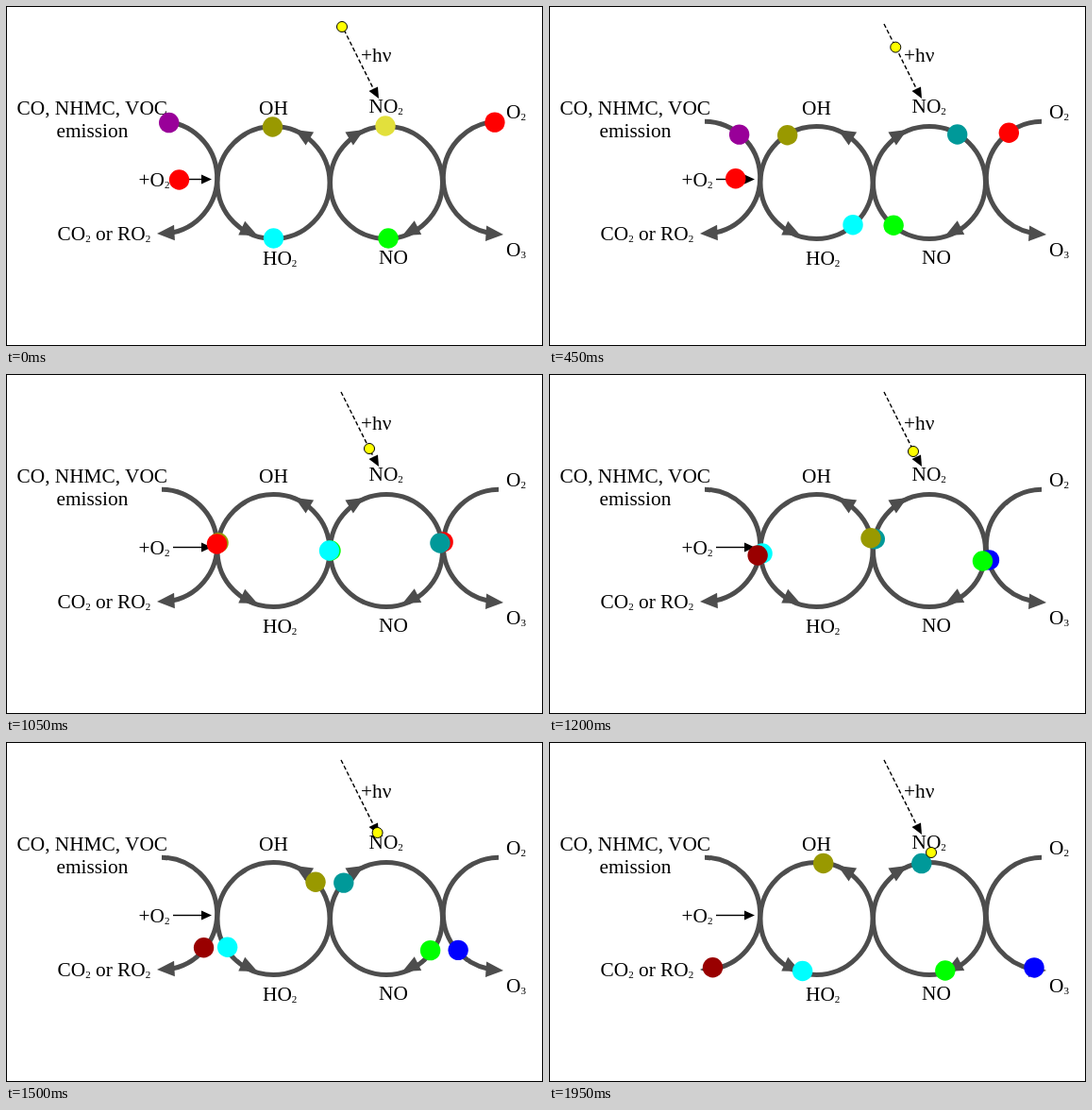
Animation of 569x360 px, one loop 2100 ms. Source, as an HTML page:

```html
<!DOCTYPE html>
<html lang="en">
<head>
<meta charset="utf-8">
<title>Radical cycle</title>
<style>
  html, body { margin: 0; width: 100%; height: 100%; overflow: hidden; background: #fff; }
  svg { display: block; width: 100vw; height: 100vh; }
  text { font: 21.33px "Liberation Serif", "Times New Roman", serif; }
  .sub { font-size: 11px; }
  .track { fill: none; stroke: #4d4d4d; stroke-width: 5; }
  .thin { stroke: #000; stroke-width: 1.4; }
</style>
</head>
<body>
<svg viewBox="0 0 569 360">
  <rect x=".5" y=".5" width="568" height="359" fill="#fff" stroke="#000"/>

  <g class="track">
    <circle cx="283.5" cy="187" r="59.5"/>
    <circle cx="403" cy="187" r="59.5"/>
    <path d="M165 122.2A59.5 59.5 0 0 1 171 240.8"/>
    <path d="M522 122.2A59.5 59.5 0 0 0 516 240.8"/>
  </g>
  <g id="heads" fill="#4d4d4d"></g>

  <path class="thin" d="M355 19L391 91" stroke-dasharray="4.5 2.5"/>
  <path d="M395 98L384.5 90L394 85.5Z"/>
  <path class="thin" d="M177 183.5H209"/>
  <path d="M218 183.5L207 178.5V188.5Z"/>

  <g id="labels"></g>
  <g id="balls"></g>
</svg>
<script>
const NS = "http://www.w3.org/2000/svg";
const STEP = 150, COUNT = 14;
const MEET = 7; // the step at which pairs of balls touch
const $ = id => document.getElementById(id);

function add(parent, tag, attrs, text = "") {
  const el = document.createElementNS(NS, tag);
  for (const name in attrs) el.setAttribute(name, attrs[name]);
  el.textContent = text;
  return parent.appendChild(el);
}

// Tip and heading in degrees
function head(x, y, turn) {
  add($("heads"), "path", { d: "M0 0L-18.5 -8.2V8.2Z", transform: `translate(${x} ${y}) rotate(${turn})` });
}
head(160, 241, 177);
head(527, 242, 4);
head(266.5, 243, 25);
head(306, 131, 211);
head(379.5, 131, -31);
head(420, 243, 153);

// Digits in a label become subscripts
function label(x, y, str) {
  const text = add($("labels"), "text", { x, y });
  let lowered = false;
  for (const part of str.split(/(\d)/).filter(Boolean)) {
    const digit = /\d/.test(part);
    const attrs = { dy: digit ? 2 : lowered ? -2 : 0 };
    if (digit) attrs.class = "sub";
    add(text, "tspan", attrs, part);
    lowered = digit;
  }
}
label(11.5, 115, "CO, NHMC, VOC");
label(53.5, 139, "emission");
label(140.5, 191, "+O2");
label(54.5, 248, "CO2 or RO2");
label(268, 115, "OH");
label(272, 274, "HO2");
label(384.5, 113, "NO2");
label(395, 273, "NO");
label(530, 119, "O2");
label(530, 265, "O3");
label(376, 59, "+hν");

const mix = (a, b, u) => a + (b - a) * u;

const line = (x1, y1, x2, y2) => u => [mix(x1, x2, u), mix(y1, y2, u)];

// A half circle; angles count from its starting pole
const half = (cx, cy, side, rise) => (from, to, r = 59) => u => {
  const a = mix(from, to, u) * Math.PI / 180;
  return [cx + side * r * Math.sin(a), cy - rise * r * Math.cos(a)];
};
const farLeft = half(164.5, 182, 1, 1);
const leftDown = half(283.5, 187, -1, 1);
const leftUp = half(283.5, 187, 1, -1);
const rightUp = half(403, 187, -1, -1);
const rightDown = half(403, 187, 1, 1);
const farRight = half(522, 182, -1, 1);

// Each leg shows one ball from its first step to its last
const legs = [];
function leg(first, last, fill, path, { ease = 1, ...attrs } = {}) {
  const el = add($("balls"), "circle", { r: 10.7, fill, ...attrs });
  legs.push({ first, last, path, ease, el });
}

const before = (...args) => leg(0, MEET - 1, ...args);
const meet = (...args) => leg(MEET, MEET, ...args);
const after = (...args) => leg(MEET + 1, COUNT - 1, ...args);

const purple = "#909", maroon = "#900", olive = "#990", cyan = "#0ff";
const green = "#0f0", teal = "#099", red = "#f00", blue = "#00f";
const inner = 57.5;

before(purple, farLeft(8, 70));
before(olive, leftDown(1, 62));
before(green, rightUp(-2, 71), { ease: 0.8 });
before(cyan, leftUp(0, 71), { ease: 0.8 });
before(red, farRight(4, 68));
leg(0, 0, "#e2e03c", line(402, 127, 402, 127));
leg(1, MEET - 1, teal, rightDown(9, 62));
before(red, line(183.5, 184, 212, 181.5));

meet(olive, leftDown(82, 82));
meet(green, rightUp(90, 90));
meet(red, farRight(86, 86));
meet(cyan, leftUp(90, 90));
meet(teal, rightDown(82, 82, inner));
meet(red, farLeft(88, 88));

after(cyan, leftDown(93, 165, inner));
after(maroon, farLeft(100, 171, inner));
after(teal, rightUp(102, 172));
after(olive, leftUp(103, 173));
after(blue, farRight(105, 172, inner));
after(green, rightDown(101, 163, inner));

const photon = { r: 5.5, stroke: "#000" };
before("#ff0", line(356, 22, 381, 70), { ...photon, ease: 1.15 });
meet("#ff0", line(385, 79, 385, 79), photon);
after("#ff0", line(386, 82, 405, 117), photon);

function draw(k) {
  for (const { first, last, path, ease, el } of legs) {
    const shown = k >= first && k <= last;
    el.setAttribute("visibility", shown ? "visible" : "hidden");
    if (!shown) continue;
    const u = first === last ? 0 : (k - first) / (last - first);
    const [x, y] = path(u ** ease);
    el.setAttribute("cx", x);
    el.setAttribute("cy", y);
  }
}

const start = performance.now();
function tick() {
  draw(Math.floor((performance.now() - start) / STEP) % COUNT);
  requestAnimationFrame(tick);
}
tick();
</script>
</body>
</html>
```
